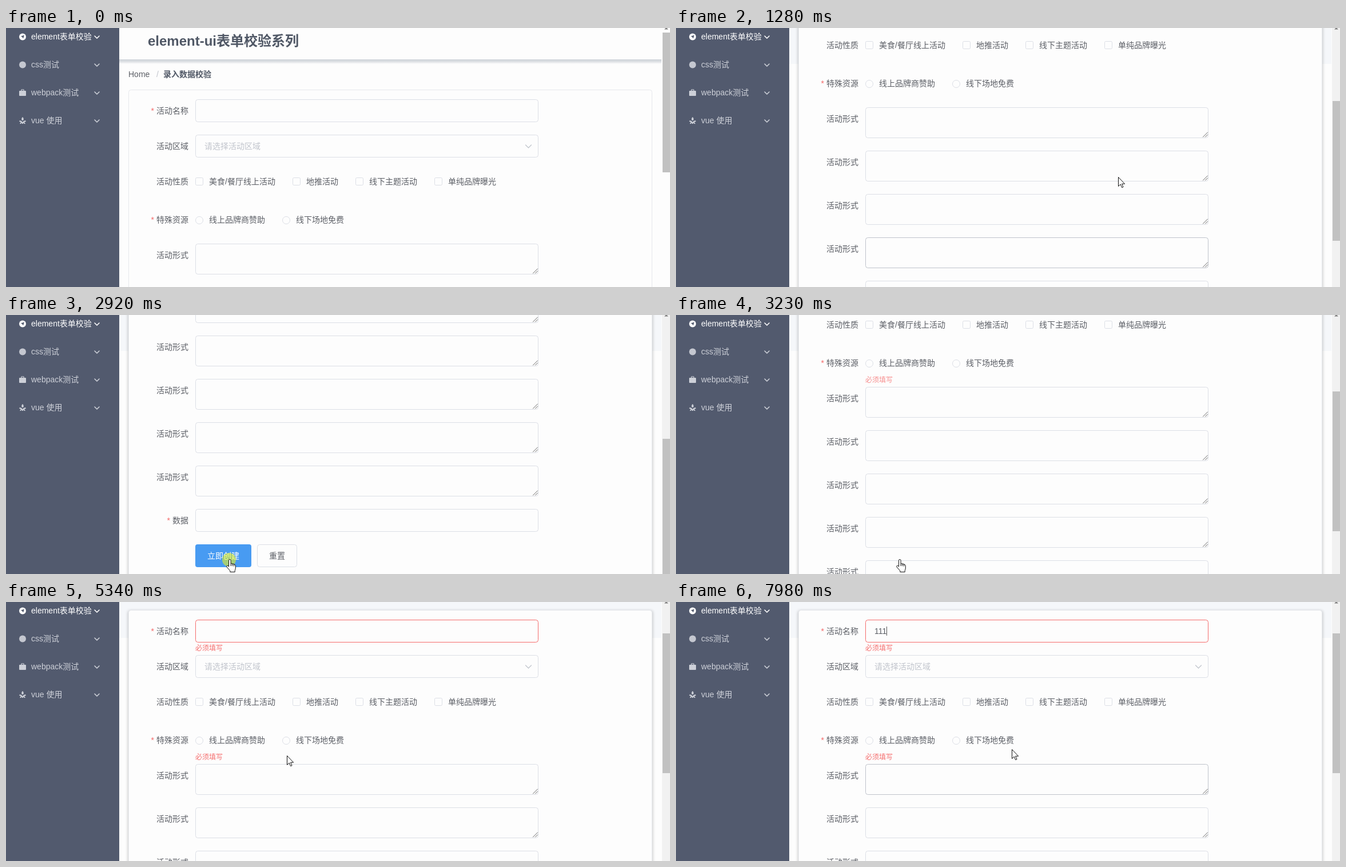
Animation, 1161 px wide and 454 px high, one loop 8 s. Source, as an HTML page:

```html
<!DOCTYPE html>
<html lang="zh">
<head>
<meta charset="utf-8">
<title>表单校验</title>
<style>
html, body { margin: 0; width: 100%; height: 100%; overflow: hidden; background: #fdfdfd; }
svg { display: block; width: 100%; height: 100%; }
text { font: 14px "Liberation Sans", Arial, "Noto Sans CJK SC", "Noto Sans CJK", sans-serif; fill: #5c5f66; white-space: pre; }
.title { font-size: 24px; font-weight: bold; fill: #505866; }
.bold { font-weight: bold; fill: #505866; }
.error { font-size: 12px; fill: #f56c6c; }
.star { fill: #f56c6c; }
.hint { fill: #c0c4cc; }
.menu { fill: #cdd0d8; }
.white { fill: #fff; }
.line { fill: none; stroke-linecap: round; stroke-linejoin: round; }
</style>
</head>
<body>
<svg id="stage" viewBox="0 0 1161 454" xmlns="http://www.w3.org/2000/svg">
  <defs>
    <linearGradient id="fade" x2="0" y2="1">
      <stop offset="0" stop-color="#cdd2d8"/>
      <stop offset=".5" stop-color="#dde0e4"/>
      <stop offset="1" stop-color="#fdfdfd"/>
    </linearGradient>
    <filter id="blur" x="-5%" y="-5%" width="110%" height="110%"><feGaussianBlur stdDeviation="2.5"/></filter>
  </defs>
  <rect width="1161" height="454" fill="#fdfdfd"/>
  <rect x="198" width="948" height="63" fill="#f5f7fa"/>
  <g id="page"></g>
  <g id="side"></g>
  <g id="bar">
    <rect x="1146" width="15" height="454" fill="#fdfdfd"/>
    <rect id="track" x="1147" width="14" fill="#f1f1f1"/>
    <rect id="thumb" x="1148" width="13" height="245" fill="#c1c1c1"/>
    <path d="M1151 2.5l3.5-3.5 3.5 3.5z" fill="#808080"/>
  </g>
  <circle id="halo" r="12" fill="#ff0" fill-opacity=".5"/>
  <g id="pointer">
    <path id="arrow" d="M.5.5v16l3.7-3.5 2.5 5.7 2.3-1-2.4-5.5h5z" fill="#fff" stroke="#111"/>
    <g id="hand" transform="translate(-6)" fill="#fff" stroke="#111">
      <path d="M4.5 13V2.3a1.8 1.8 0 0 1 3.6 0V7.5l5.4 1.2q2.8.7 2.8 3.3v4q0 2-1.1 3.8v2.7H6.8v-2.2L1.2 14q-1.2-2 .3-2.7 1.5-.4 3 1.7z"/>
      <path d="M8.1 7.5v4.5M10.8 8.2v4M13.4 8.8v3.7" fill="none"/>
    </g>
    <path id="beam" d="M-3-8h2.5l.5.5.5-.5H3M0-7.5v15M-3 8.5h2.5l.5-.5.5.5H3" fill="none" stroke="#333"/>
  </g>
</svg>
<script>
const LOOP = 8000, LAG = 200, MAX = 418;
const BORDER = '#dcdfe6', HOVER = '#bfc3cb', RED = '#f56c6c';
const byId = id => document.getElementById(id);
const page = byId('page'), side = byId('side');

function add(parent, tag, attrs, content) {
  const el = document.createElementNS('http://www.w3.org/2000/svg', tag);
  for (const k in attrs) el.setAttribute(k, attrs[k]);
  if (content) el.textContent = content;
  parent.appendChild(el);
  return el;
}
const text = (parent, x, y, str, cls = '', anchor = 'start') =>
  add(parent, 'text', { x, y, class: cls, 'text-anchor': anchor }, str);
const box = (x, y, w, h, rx = 4, fill = '#fdfdfd') =>
  add(page, 'rect', { x: x + .5, y: y + .5, width: w - 1, height: h - 1, rx, fill, stroke: BORDER });
const line = (parent, d, stroke, width = 1) =>
  add(parent, 'path', { d, class: 'line', stroke, 'stroke-width': width });

// Scrolling page
add(page, 'rect', { x: 198, y: -20, width: 948, height: 83, fill: '#fdfdfd' });
add(page, 'rect', { x: 198, y: 55, width: 948, height: 8, fill: 'url(#fade)' });
text(page, 248, 31, 'element-ui表单校验系列', 'title');
text(page, 214, 86, 'Home');
text(page, 263, 86, '/', 'hint');
text(page, 275, 86, '录入数据校验', 'bold');

const shadow = add(page, 'rect', { x: 213, y: 109, width: 918, height: 792, rx: 4, fill: '#000', filter: 'url(#blur)' });
box(214, 108, 916, 792).setAttribute('stroke', '#e6e8ec');

function label(cy, str, required) {
  text(page, 319, cy + 5, str, '', 'end');
  if (required) text(page, 315 - str.length * 14, cy + 5, '*', 'star', 'end');
}
const fields = [];
function field(y, h) {
  const el = box(331, y, 600, h);
  const f = { el, y, h, invalid: false };
  fields.push(f);
  return f;
}

label(145, '活动名称', true);
const nameField = field(125, 40);
label(207, '活动区域');
field(187, 40);
text(page, 347, 212, '请选择活动区域', 'hint');
line(page, 'M908.5 205l5 5 5-5', '#c0c4cc', 1.2);

label(269, '活动性质');
[[331, '美食/餐厅线上活动'], [501, '地推活动'], [611, '线下主题活动'], [749, '单纯品牌曝光']].forEach(([x, str]) => {
  box(x, 262, 14, 14, 2);
  text(page, x + 24, 274, str);
});
label(336, '特殊资源', true);
[[338, '线上品牌商赞助'], [490, '线下场地免费']].forEach(([cx, str]) => {
  add(page, 'circle', { cx, cy: 337, r: 6.5, fill: '#fdfdfd', stroke: BORDER });
  text(page, cx + 17, 341, str);
});

for (let i = 0; i < 5; i++) {
  const y = 378 + 76 * i;
  label(y + 20, '活动形式');
  field(y, 54);
  line(page, `M921.5 ${y + 52}l8-8m-4 8l4-4`, '#666');
}
label(778, '数据', true);
const dataField = field(758, 40);
add(page, 'rect', { x: 331, y: 820, width: 98, height: 40, rx: 4, fill: '#489bf2' });
text(page, 380, 845, '立即创建', 'white', 'middle');
box(439, 820, 70, 40);
text(page, 474, 845, '重置', '', 'middle');

const errors = [179, 370, 812].map(y => text(page, 331, y, '必须填写', 'error'));
const value = text(page, 347, 150, '');
const caret = add(page, 'rect', { y: 137, width: 1, height: 16, fill: '#555' });

// Side menu
add(side, 'rect', { width: 198, height: 454, fill: '#525a6e' });
['element表单校验', 'css测试', 'webpack测试', 'vue 使用'].forEach((str, i) => {
  const y = 15 + 49 * i;
  text(side, 44, y + 5, str, i ? 'menu' : 'white');
  line(side, `M155 ${y - 1}l4 4 4-4`, i ? '#cdd0d8' : '#fff', 1.6);
});
add(side, 'circle', { cx: 29, cy: 15.5, r: 6, fill: '#fff' });
add(side, 'path', { d: 'M32 12.5l-2 6-1.5-2.5-2.5-1.5z', fill: '#525a6e' });
add(side, 'circle', { cx: 29, cy: 64.5, r: 6, fill: '#c4c7d0' });
add(side, 'rect', { x: 23, y: 110, width: 12, height: 9, rx: 1, fill: '#cdd0d8' });
line(side, 'M27 110v-2h4v2', '#cdd0d8', 1.2);
add(side, 'path', { d: 'M29 156q3 3 1 6h-2q-2-3 1-6zM24 162l3 1 2 2 2-2 3-1 1 2-3 1 2 3h-2l-2-2v2h-2v-2l-2 2h-2l2-3-3-1z', fill: '#cdd0d8' });

// Motion: [time, value...]
const scrollKeys = [
  [0, 0], [400, 0], [580, 200], [680, 200], [820, MAX], [1050, MAX], [1590, 0],
  [1909, 0], [1910, 100], [1980, 100], [2450, MAX], [2990, MAX], [3460, 94]
];
const pointerKeys = [
  [70, 940, 330, 'arrow'], [300, 791, 225, 'hand'], [680, 791, 225, 'hand'], [820, 785, 230, 'arrow'],
  [899, 785, 230, 'arrow'], [900, 785, 248, 'arrow'], [1050, 785, 248, 'arrow'], [1590, 757, 279, 'hand'],
  [1980, 757, 279, 'hand'], [2620, 390, 432, 'hand'], [2769, 390, 432, 'hand'], [2770, 391, 428, 'hand'],
  [3630, 391, 428, 'hand'], [3860, 440, 460, 'none'], [4240, 655, 25, 'arrow'], [4400, 655, 25, 'arrow'],
  [4640, 580, 29, 'arrow'], [4800, 580, 29, 'arrow'], [5410, 480, 300, 'arrow'], [5580, 480, 300, 'arrow'],
  [5810, 470, 290, 'arrow'], [5960, 470, 290, 'arrow'], [6200, 372, 53, 'beam'], [7450, 372, 53, 'beam'],
  [7740, 560, 310, 'arrow'], [7980, 587, 258, 'arrow']
];
const clicks = [[2920, 3070, 390, 429], [6420, 6590, 370, 53]];
const clamp = v => Math.max(0, Math.min(1, v));
const mix = (a, b, u) => a + (b - a) * u;

function sample(keys, t) {
  let i = 0;
  while (i < keys.length - 1 && keys[i + 1][0] <= t) i++;
  const a = keys[i], b = keys[i + 1] || a;
  const u = b === a ? 0 : clamp((t - a[0]) / (b[0] - a[0]));
  return a.map((v, k) => typeof v === 'number' ? mix(v, b[k], u) : v);
}
const scrollAt = t => sample(scrollKeys, t)[1];
function pointerAt(t) {
  const [, x, y, kind] = sample(pointerKeys, t);
  return { x, y, kind: t < 70 ? 'none' : kind };
}
const show = (el, on) => el.setAttribute('visibility', on ? 'visible' : 'hidden');

function draw(t) {
  const s = scrollAt(t), top = 8 + s / 2;
  page.setAttribute('transform', `translate(0 ${-Math.round(s)})`);
  byId('thumb').setAttribute('y', Math.round(top));
  byId('track').setAttribute('height', t < 70 ? 0 : t < 820 ? top + 245 : 454);
  shadow.setAttribute('opacity', .2 * clamp((t - 120) / 300));

  const p = pointerAt(t);
  byId('pointer').setAttribute('transform', `translate(${Math.round(p.x)} ${Math.round(p.y)})`);
  for (const kind of ['arrow', 'hand', 'beam']) show(byId(kind), p.kind === kind);

  const click = clicks.find(c => t >= c[0] && t < c[1]);
  show(byId('halo'), click);
  if (click) {
    byId('halo').setAttribute('cx', click[2]);
    byId('halo').setAttribute('cy', click[3]);
  }

  const fail = clamp((t - 3000) / 300);
  errors.forEach(el => el.setAttribute('opacity', fail));
  nameField.invalid = dataField.invalid = fail > 0;

  // Borders keep the hover tint briefly after the pointer leaves
  const was = pointerAt(t - LAG), wasY = was.y + scrollAt(t - LAG);
  for (const f of fields) {
    const over = was.kind !== 'none' && was.x > 331 && was.x < 931 && wasY > f.y && wasY < f.y + f.h;
    f.el.setAttribute('stroke', f.invalid ? RED : over ? HOVER : BORDER);
  }

  value.textContent = '1'.repeat([7220, 7450, 7610].filter(at => t >= at).length);
  const width = value.textContent ? value.getComputedTextLength() : 0;
  caret.setAttribute('x', Math.floor(347 + width));
  show(caret, t >= 6420 && (t < 6970 || t >= 7220));
}

const start = performance.now();
function tick() {
  draw((performance.now() - start) % LOOP);
  requestAnimationFrame(tick);
}
tick();
</script>
</body>
</html>
```
